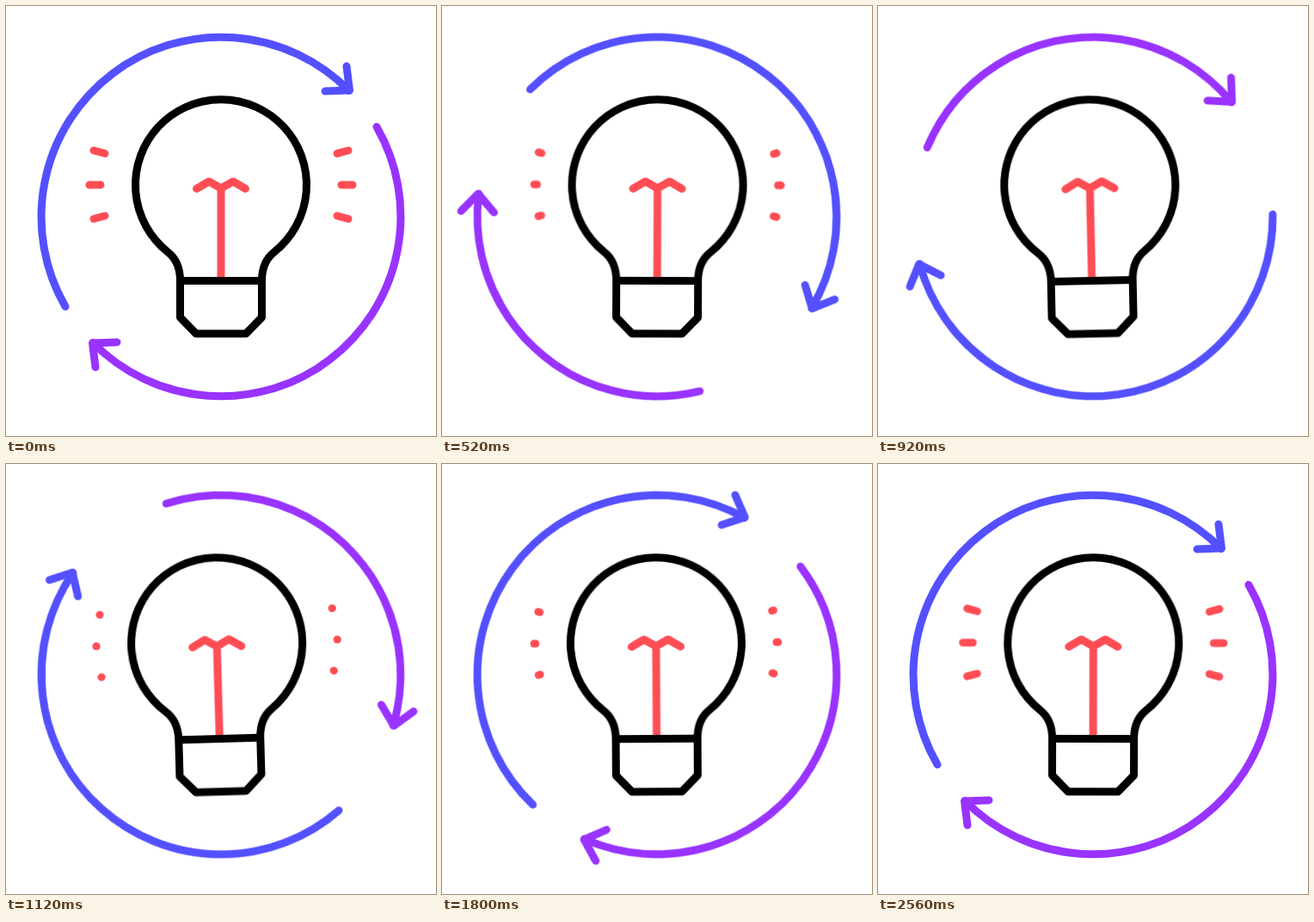
Animation of 500 by 500 pixels, one loop 2.6 s. Source, as an HTML page:

```html
<!DOCTYPE html>
<html lang="en">
<head>
<meta charset="utf-8">
<title>Idea cycle</title>
<style>
  html, body { margin: 0; width: 100%; height: 100%; overflow: hidden; background: #fff; }
  svg { display: block; width: 100vw; height: 100vh; }
  svg * { fill: none; stroke-width: 9; stroke-linecap: round; stroke-linejoin: round; }

  :root {
    --soft: cubic-bezier(.333, 0, .667, 1);
    --swing: cubic-bezier(.33, 0, .254, 1);
  }
  .blue { stroke: #5450ff; }
  .purple { stroke: #9933ff; }
  .red { stroke: #ff4d55; }
  .black { stroke: #000; }

  .lead, .follow { transform-origin: 250px 245px; }
  .lead { animation: lead 2600ms infinite var(--swing); }
  .follow { animation: follow 2600ms infinite var(--swing); }
  .tail { animation: tail 2600ms infinite var(--soft); }
  .bulb { transform-origin: 250px 381px; animation: wobble 650ms infinite var(--soft); }
  .rays path { stroke-dasharray: 13 40; animation: ray 650ms infinite var(--soft); }

  @keyframes lead {
    0% { transform: rotate(0deg); }
    92.308%, 100% { transform: rotate(360deg); }
  }
  /* same swing, 80 ms later */
  @keyframes follow {
    0%, 3.077% { transform: rotate(180deg); }
    95.385%, 100% { transform: rotate(540deg); }
  }
  @keyframes tail {
    0%, 3.077% { stroke-dasharray: 165.5 400; }
    18.462% { stroke-dasharray: 111 400; }
    95.385%, 100% { stroke-dasharray: 165.5 400; }
  }
  @keyframes wobble {
    0% { transform: rotate(0deg); }
    11.5% { transform: rotate(6deg); }
    59.2% { transform: rotate(-4.4deg); }
    83.1% { transform: rotate(.4deg); }
    100% { transform: rotate(0deg); }
  }
  /* leaves outward, then grows again from the inner end */
  @keyframes ray {
    0% { stroke-dashoffset: 0; }
    24.6% { stroke-dashoffset: -13; animation-timing-function: step-start; }
    24.7%, 69.9% { stroke-dashoffset: 20; animation-timing-function: step-end; }
    70% { stroke-dashoffset: 13; }
    100% { stroke-dashoffset: 0; }
  }
</style>
</head>
<body>
<svg viewBox="0 0 500 500">
  <g class="lead blue">
    <path d="M399 98.5A209 209 0 0 0 69 349.5"/>
    <path d="M396 70L399.5 98L371 99"/>
  </g>
  <g class="follow purple">
    <path class="tail" pathLength="165.5" d="M399 98.5A209 209 0 0 0 69 349.5"/>
    <path d="M396 70L399.5 98L371 99"/>
  </g>
  <g class="bulb">
    <g class="rays red">
      <path pathLength="13" d="M115 171.5L102 168"/>
      <path pathLength="13" d="M110 208H97"/>
      <path pathLength="13" d="M115 244L102 247.5"/>
      <path pathLength="13" d="M385 171.5L398 168"/>
      <path pathLength="13" d="M390 208H403"/>
      <path pathLength="13" d="M385 244L398 247.5"/>
    </g>
    <path class="red" d="M221.5 212.5L236 204L250 212L264 204L278.5 212.5M250 212V315"/>
    <path class="black" d="M202.500 319.500C202.500 305 197 293 188 286A99.500 99.500 0 1 1 312 286C303 293 297.500 305 297.500 319.500"/>
    <path class="black" d="M202.500 319.500H297.500V362L279 381H221L202.500 362Z"/>
  </g>
</svg>
</body>
</html>
```
